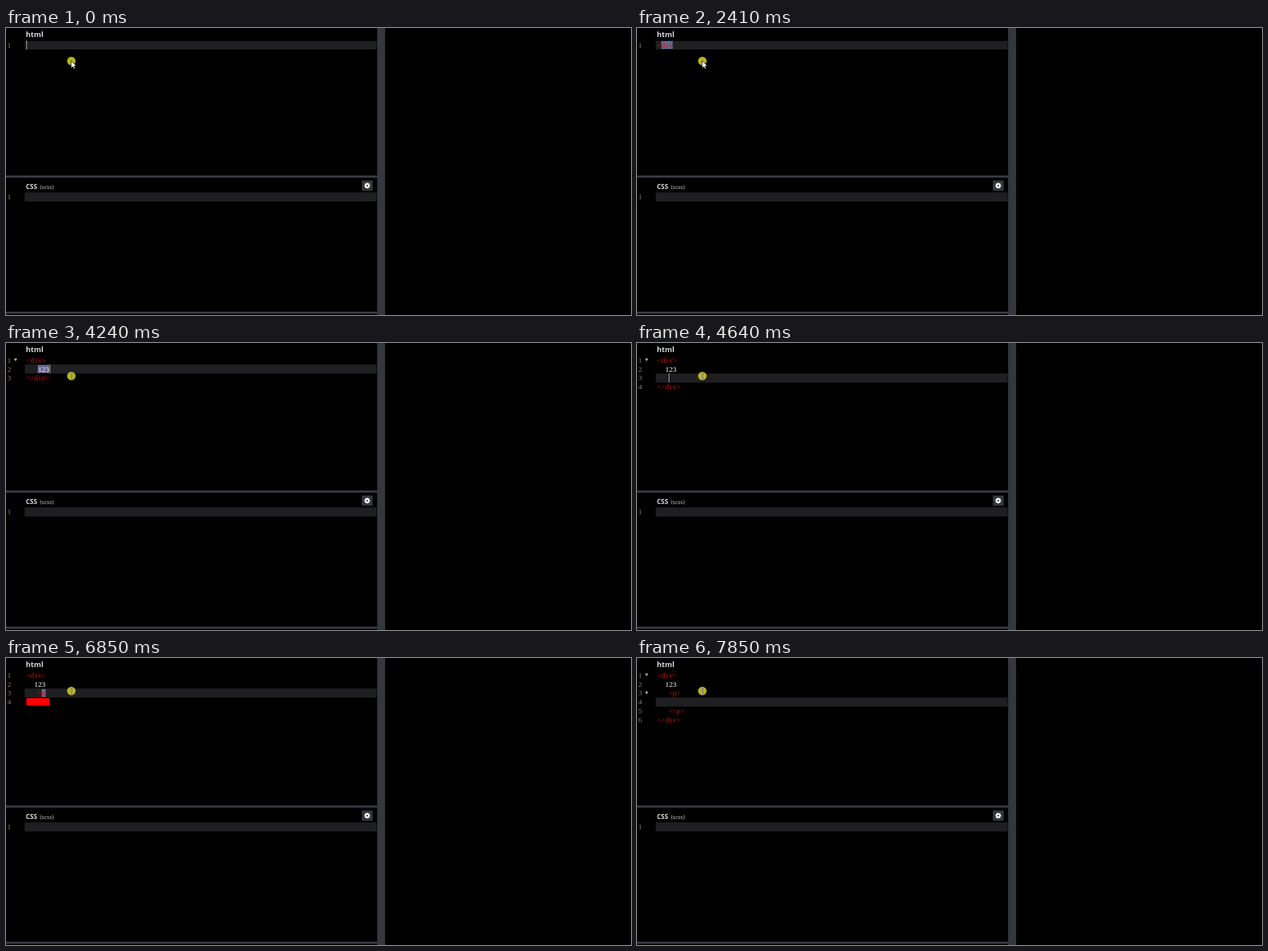
Animation, 1103 px wide and 508 px high, one loop 8 s. Source, as an HTML page with a canvas:

```html
<!DOCTYPE html>
<html lang="en">
<head>
<meta charset="utf-8">
<title>Code editor</title>
<style>
  html, body { margin: 0; width: 100%; height: 100%; overflow: hidden; background: #000; }
  canvas { display: block; }
</style>
</head>
<body>
<canvas id="stage" width="1103" height="508"></canvas>
<script>
const ctx = document.getElementById('stage').getContext('2d');
const LOOP = 8000;
const CODE_FONT = '13.4px "Liberation Serif", serif';
const UI_FONT = '"Open Sans", "Noto Sans", sans-serif';
const TAG = '#cb1212', BAND = '#1f1f21', PANEL = '#34383c', MARK = '#666890';

const colX = c => 36.3 + 6.7 * c;
const rowY = r => 22.4 + 15.8 * r;

// Each step changes part of the editor state.
// caret: [row, col] or null; marks: [row, col, length]; folds: rows with an arrow
const steps = [
  [0, { lines: [''], active: 0, caret: [0, 0], marks: [], folds: [], error: null, beam: false }],
  [410, { caret: null }],
  [610, { lines: ['<'], caret: [0, 1] }],
  [1020, { caret: null }],
  [1620, { lines: ['<d'], caret: [0, 2], marks: [[0, 1, 1]] }],
  [1810, { lines: ['<div'], caret: [0, 4], marks: [] }],
  [2030, { marks: [[0, 1, 3]] }],
  [2410, { caret: null }],
  [2810, { lines: ['<div>', '', '</div>'], active: 1, caret: [1, 3], marks: [[0, 1, 3], [2, 2, 3]], beam: true }],
  [3010, { marks: [] }],
  [3210, { folds: [0] }],
  [3410, { caret: null }],
  [3840, { lines: ['<div>', '  1', '</div>'], caret: [1, 3] }],
  [4030, { lines: ['<div>', '  123', '</div>'], caret: [1, 5] }],
  [4240, { lines: ['<div>', '   123', '</div>'], caret: [1, 6], marks: [[1, 3, 3]] }],
  [4640, { lines: ['<div>', '  123', '', '</div>'], active: 2, caret: [2, 3], marks: [] }],
  [5040, { caret: null }],
  [5630, { caret: [2, 3] }],
  [6040, { lines: ['<div>', '  123', '   <', '</div>'], caret: [2, 4] }],
  [6230, { lines: ['<div>', '  123', '   <p', '</div>'], caret: [2, 5], marks: [[2, 4, 1]], error: 3 }],
  [6640, { caret: null }],
  [6850, { folds: [] }],
  [7250, { lines: ['<div>', '  123', '   <p>', '', '   </p>', '</div>'], active: 3, caret: [3, 6], marks: [], error: null }],
  [7660, { folds: [0, 2] }],
  [7850, { caret: null }]
];

function stateAt(t) {
  const state = {};
  for (const [start, change] of steps) if (start <= t) Object.assign(state, change);
  return state;
}

function box(color, x, y, w, h) {
  ctx.fillStyle = color;
  ctx.fillRect(x, y, w, h);
}

function label(text, x, y, font, color) {
  ctx.font = font;
  ctx.fillStyle = color;
  ctx.textAlign = 'left';
  ctx.fillText(text, x, y);
}

function poly(points, color) {
  ctx.beginPath();
  points.forEach(([x, y]) => ctx.lineTo(x, y));
  ctx.closePath();
  ctx.fillStyle = color;
  ctx.fill();
}

function disc(x, y, r, color) {
  ctx.beginPath();
  ctx.arc(x, y, r, 0, Math.PI * 2);
  ctx.fillStyle = color;
  ctx.fill();
}

// Monospaced text: every character is centred in its cell.
function cells(text, x, y, color) {
  ctx.font = CODE_FONT;
  ctx.fillStyle = color;
  ctx.textAlign = 'center';
  [...text].forEach((ch, i) => ctx.fillText(ch, x + 6.7 * (i + 0.5), y));
}

function gear(x, y) {
  ctx.save();
  ctx.translate(x, y);
  for (let i = 0; i < 8; i++) {
    box('#fff', -1.2, -5, 2.4, 3);
    ctx.rotate(Math.PI / 4);
  }
  ctx.restore();
  disc(x, y, 3.8, '#fff');
  disc(x, y, 1.6, PANEL);
}

function drawPanels() {
  box('#000', 0, 0, 1103, 508);
  box(PANEL, 655, 0, 14, 508);
  for (const y of [261, 502]) {
    box('#33333d', 0, y, 655, 4);
    box('#40404b', 0, y + 1, 655, 1);
  }
  label('html', 35, 16, 'bold 13px ' + UI_FONT, '#d4d7da');
  label('CSS', 35, 285, 'bold 11.5px ' + UI_FONT, '#d4d7da');
  label('(scss)', 60, 285, '9.6px ' + UI_FONT, '#d4d7da');
  box(PANEL, 628, 270, 19, 18);
  gear(637.5, 279);
  box(BAND, 33, 291, 621, 16);
  cells('1', 2.2, 303, '#8a7a68');
}

function drawCode(s) {
  box(BAND, 33, Math.round(rowY(s.active)) + (s.active ? 0 : 1), 621, s.active ? 16 : 15);
  for (const [row, col, len] of s.marks)
    box(MARK, Math.round(colX(col)), Math.round(rowY(row)) + 1, Math.round(6.7 * len), 14);

  s.lines.forEach((line, row) => {
    const base = Math.round(rowY(row) + 12.3);
    cells(String(row + 1), 2.2, base, '#8a7a68');
    cells(line, colX(0), base, line.includes('<') ? TAG : '#f4f4f4');
  });

  if (s.error !== null) box('#f00', 36, Math.round(rowY(s.error)) + 1, 41, 13);
  for (const row of s.folds) {
    const y = Math.round(rowY(row)) + 5.5;
    poly([[14.3, y], [19.7, y], [17, y + 5]], '#b4b4b4');
  }
  if (s.caret) box('#c4c4c4', Math.round(colX(s.caret[1])), Math.round(rowY(s.caret[0])), 1, 16);
}

function drawPointer(beam) {
  disc(115.3, 58.5, 7.5, 'rgba(200,198,36,.9)');
  if (beam) {
    box('#85819a', 115, 54, 2, 10);
    box('#85819a', 113, 53, 6, 1);
    box('#85819a', 113, 64, 6, 1);
    return;
  }
  const arrow = [[115, 58], [115, 71], [118, 68.3], [120, 72.5], [122, 71.6], [120.2, 67.4], [124, 67.2]];
  poly(arrow, '#fff');
  ctx.strokeStyle = '#000';
  ctx.lineWidth = 0.9;
  ctx.stroke();
}

function frame() {
  const s = stateAt(performance.now() % LOOP);
  drawPanels();
  drawCode(s);
  drawPointer(s.beam);
  requestAnimationFrame(frame);
}
frame();
</script>
</body>
</html>
```
